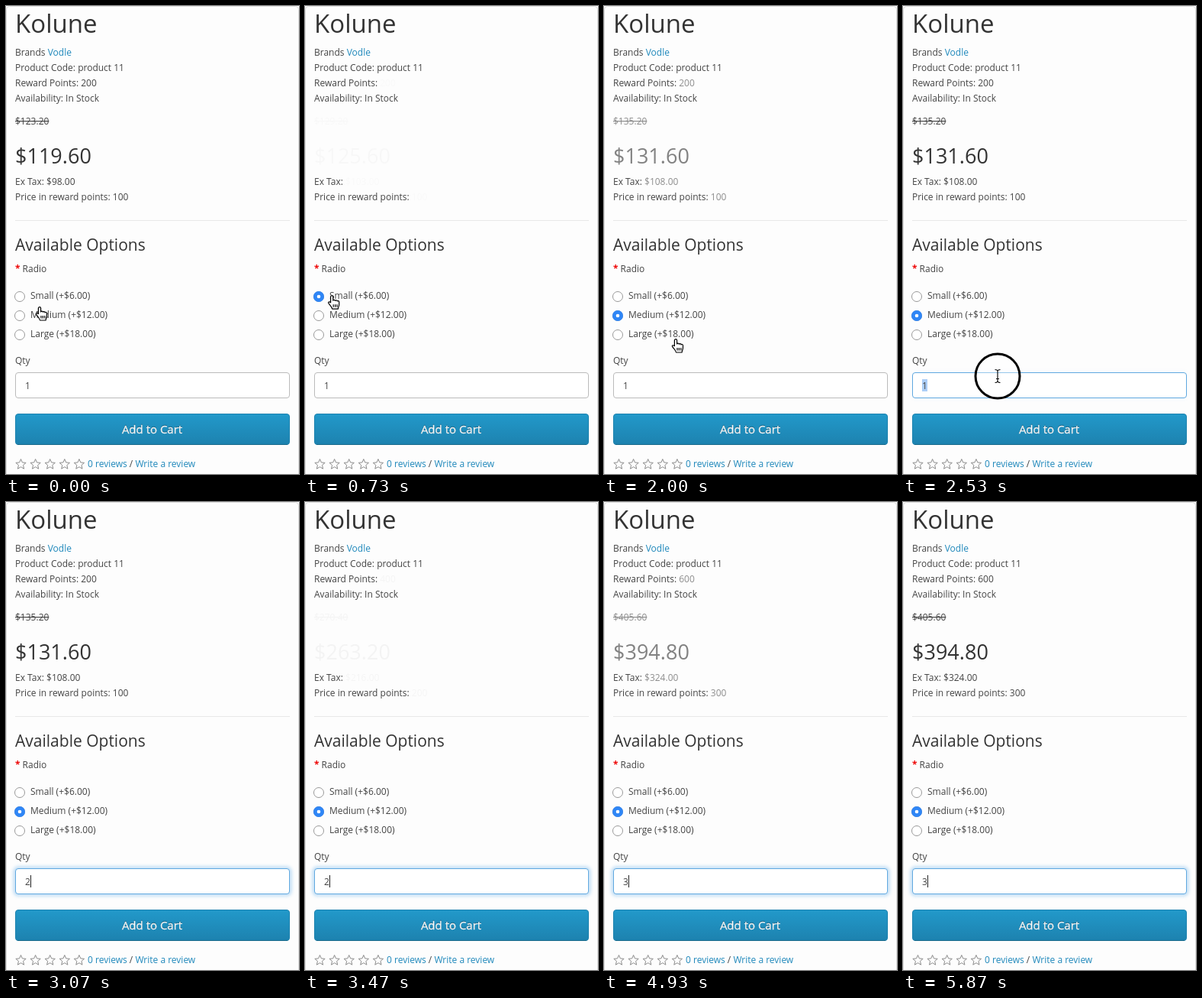
Animation of 384 by 612 pixels, one loop 5940 ms. Source, as an HTML page:

```html
<!DOCTYPE html>
<html lang="en">
<head>
<meta charset="utf-8">
<title>Product options</title>
<style>
  html, body { margin: 0; width: 100%; height: 100%; overflow: hidden; background: #fff; }
  svg { display: block; width: 384px; height: 612px; }
  text { font: 12px "Open Sans", "Noto Sans", sans-serif; fill: #444; }
  .h1 { font-size: 33px; fill: #333; }
  .h2 { font-size: 27px; fill: #333; }
  .h3 { font-size: 21px; fill: #333; }
  .link { fill: #1f88bb; }
  .button { font-size: 15px; fill: #fff; stroke: #fff; stroke-width: .3; text-anchor: middle; text-shadow: 0 -1px 0 rgba(0,0,0,.25); }
  #oldPrice { text-decoration: line-through; }
</style>
</head>
<body>
<svg viewBox="0 0 384 612">
  <defs>
    <linearGradient id="blue" x2="0" y2="1">
      <stop stop-color="#2299ca"/>
      <stop offset="1" stop-color="#1d82af"/>
    </linearGradient>
    <filter id="blur" x="-5%" y="-40%" width="110%" height="180%">
      <feGaussianBlur stdDeviation="2.5"/>
    </filter>
  </defs>
  <rect x=".5" y=".5" width="383" height="640" rx="4" fill="#fdfdfd" stroke="#ddd"/>

  <text class="h1" x="12" y="35">Kolune</text>
  <text x="12" y="65">Brands <tspan class="link">Vodle</tspan></text>
  <text x="12" y="85">Product Code: product 11</text>
  <text x="12" y="105">Reward Points: <tspan id="reward"/></text>
  <text x="12" y="125">Availability: In Stock</text>
  <text x="12" y="155" id="oldPrice"></text>
  <text x="12" y="206" id="price" class="h2"></text>
  <text x="12" y="234">Ex Tax: <tspan id="exTax"/></text>
  <text x="12" y="254">Price in reward points: <tspan id="points"/></text>
  <path d="M12 280.5H372" stroke="#e8e8e8"/>

  <text class="h3" x="12" y="320">Available Options</text>
  <text x="12" y="348"><tspan fill="#e00" style="font-weight:700">*</tspan><tspan x="21.6">Radio</tspan></text>
  <g id="radios"></g>

  <text x="12" y="468">Qty</text>
  <g id="focus">
    <rect x="12" y="479" width="360" height="34" rx="4" fill="none" stroke="#66afe9" stroke-width="3" opacity=".7" filter="url(#blur)"/>
  </g>
  <rect id="field" x="12.5" y="479.5" width="359" height="33" rx="3.5" fill="#fff"/>
  <rect id="selection" x="25" y="488" width="7" height="16" fill="#accef7"/>
  <text id="qty" x="25" y="501"></text>
  <path id="caret" d="M32.5 488V504" stroke="#222"/>

  <rect x="12.5" y="533.5" width="359" height="40" rx="3.5" fill="url(#blue)" stroke="#1f84b0"/>
  <path d="M15 573.5H369" stroke="#145e7a" opacity=".7"/>
  <text class="button" x="191.5" y="559">Add to Cart</text>

  <g id="stars" fill="none" stroke="#8c8c8c" stroke-linejoin="round"></g>
  <text x="107" y="603"><tspan class="link">0 reviews</tspan> / <tspan class="link">Write a review</tspan></text>

  <g id="pointer">
    <circle id="ring" r="29" fill="#fff" fill-opacity=".35" stroke="#000" stroke-width="3"/>
    <path id="hand" fill="#fff" stroke="#000" stroke-width="1.2" stroke-linejoin="round"
      d="M-1.6 9V1.2a1.6 1.6 0 0 1 3.2 0V6c.3-1.2 2.6-1.2 2.8.2c.4-.9 2.5-.8 2.7.6c.6-.8 2.4-.4 2.4 1.2V11c0 2.5-1.2 3.2-1.4 6H.5C0 14.2-2.6 12-4.3 9.6c-1.1-1.7 1-2.8 2.7-.6M2 11v3.5M4.4 11v3.5M6.8 11v3.5"/>
    <path id="arrow" fill="#000" stroke="#fff" d="M0 0V14L3.3 11L5.6 16.2L8 15.2L5.7 10.2H10Z"/>
    <g id="beam" fill="none">
      <path id="beamShape" d="M-3.5-8.5Q0-8.5 0-6Q0-8.5 3.5-8.5M0-6V6M-2 3.5H2M-3.5 8.5Q0 8.5 0 6Q0 8.5 3.5 8.5" stroke="#111" stroke-width="1.2"/>
    </g>
  </g>
</svg>
<script>
const LOOP = 5940, FADE = 300;
const $ = id => document.getElementById(id);
const show = (id, on) => $(id).setAttribute("visibility", on ? "visible" : "hidden");
const within = (t, [from, to]) => t >= from && t < to;
const latest = (list, t) => list.filter(item => item.at <= t).pop();

const updates = [
  { at: -FADE * 2, extra: 0, qty: 1 },
  { at: 400, extra: 6, qty: 1 },
  { at: 1530, extra: 12, qty: 1 },
  { at: 3130, extra: 12, qty: 2 },
  { at: 4460, extra: 12, qty: 3 }
];
const choices = [{ at: 0, index: -1 }, { at: 390, index: 0 }, { at: 1530, index: 1 }];
const keys = [{ at: 0, value: 1 }, { at: 3000, value: 2 }, { at: 4440, value: 3 }];
const selections = [[2530, 3000], [3870, 4440]];
const presses = [[260, 390], [1400, 1530], [2520, 2600], [2660, 2730], [3860, 3930], [4000, 4060]];
const hiddenPointer = [[3000, 3730], [4440, LOOP]];
const focusAt = 2520;
const path = [
  [0, 44, 394], [230, 35, 379], [700, 35, 379], [1300, 64, 403],
  [1600, 64, 403], [2000, 94, 436], [2400, 124, 484], [LOOP, 124, 484]
];

$("radios").innerHTML = ["Small (+$6.00)", "Medium (+$12.00)", "Large (+$18.00)"].map((label, i) => {
  const y = 380 + 25 * i;
  return `<circle cx="18" cy="${y}" r="6.5" fill="#fff" stroke="#999"/>
    <g id="choice${i}"><circle cx="18" cy="${y}" r="7" fill="#2f86f6"/><circle cx="18" cy="${y}" r="2.3" fill="#fff"/></g>
    <text x="32" y="${y + 3}">${label}</text>`;
}).join("");

const star = cx => Array.from({ length: 10 }, (_, i) => {
  const angle = i * Math.PI / 5, r = i % 2 ? 3.2 : 7;
  return [cx + r * Math.sin(angle), 599.5 - r * Math.cos(angle)].map(v => v.toFixed(2)).join();
}).join(" ");
for (let i = 0; i < 5; i++) $("stars").innerHTML += `<polygon points="${star(19.5 + 19.1 * i)}"/>`;

function drawPrices(t) {
  const index = updates.indexOf(latest(updates, t));
  const age = t - updates[index].at;
  const fadingOut = age < FADE;
  const { extra, qty } = updates[fadingOut ? index - 1 : index];
  const opacity = Math.abs(.5 + .5 * Math.cos(Math.PI * Math.min(age / FADE, 2)));
  const money = value => "$" + (value * qty).toFixed(2);
  const values = {
    reward: 200 * qty,
    oldPrice: money(123.2 + extra),
    price: money(119.6 + extra),
    exTax: money(98 + extra * 5 / 6),
    points: 100 * qty
  };
  for (const id in values) {
    $(id).textContent = values[id];
    $(id).setAttribute($(id).tagName === "text" ? "opacity" : "fill-opacity", opacity);
  }
}

function drawField(t) {
  const focused = t >= focusAt;
  const key = latest(keys, t);
  const selected = selections.some(span => within(t, span));
  $("focus").setAttribute("opacity", Math.max(0, Math.min(1, (t - focusAt) / 150)));
  $("field").setAttribute("stroke", focused ? "#5fa8e0" : "#bbb");
  $("qty").textContent = key.value;
  show("selection", selected);
  show("caret", focused && !selected && (t - key.at) % 1000 < 500);
}

function drawPointer(t) {
  const next = path.findIndex(point => point[0] > t);
  const [t0, x0, y0] = path[next - 1], [t1, x1, y1] = path[next];
  const p = (t - t0) / (t1 - t0), ease = p * p * (3 - 2 * p);
  const x = x0 + (x1 - x0) * ease, y = y0 + (y1 - y0) * ease;
  const visible = !hiddenPointer.some(span => within(t, span));
  $("pointer").setAttribute("transform", `translate(${x} ${y})`);
  show("ring", visible && presses.some(span => within(t, span)));
  show("hand", visible && y < 442);
  show("arrow", visible && y >= 442 && y < 479);
  show("beam", visible && y >= 479);
}

function draw(time) {
  // The picture advances at 15 steps a second.
  const step = Math.floor((Math.floor(time % LOOP / 10) + .5) * .15);
  const t = Math.round(step * 20 / 3) * 10;
  const choice = latest(choices, t).index;
  for (let i = 0; i < 3; i++) show("choice" + i, i === choice);
  drawPrices(t);
  drawField(t);
  drawPointer(t);
}

const start = performance.now();
function tick() {
  draw(performance.now() - start);
  requestAnimationFrame(tick);
}
tick();
</script>
</body>
</html>
```
